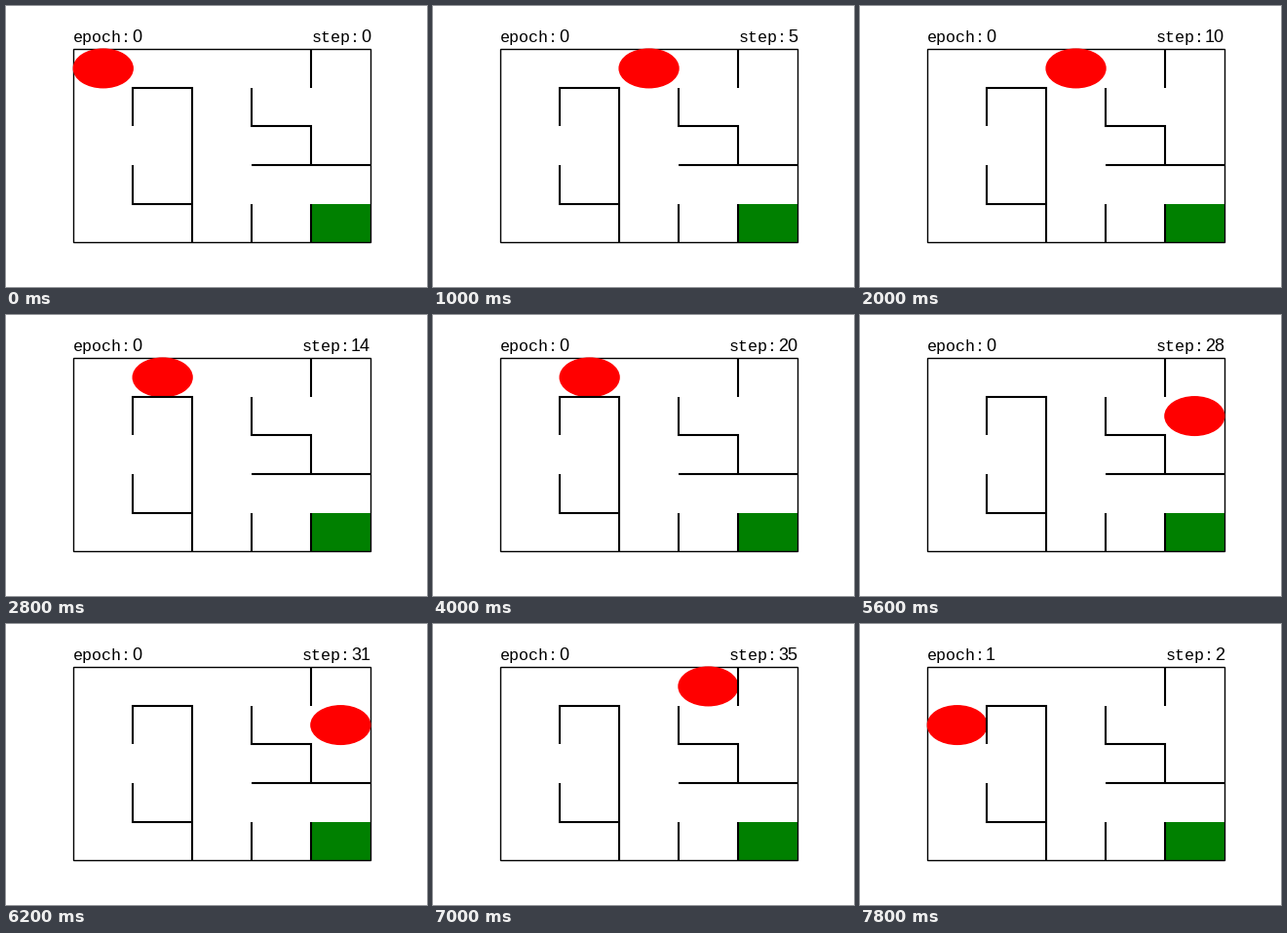
Write a matplotlib script that moves like this. It is 432 px wide and 288 px high and loops after 8 s.

```python
import matplotlib.pyplot as plt
from matplotlib.animation import FuncAnimation
from matplotlib.patches import Ellipse, Rectangle

W, H, DPI = 432, 288, 100
LEFT, TOP = 69.3, 44.1
CELL_W, CELL_H = 60.9, 39.65
SIZE = 5
PITCH = 10          # width of one label character
BASELINE = 37
FRAMES, INTERVAL = 40, 200
EPOCH_STEPS = 37

# One "column row" pair per frame
PATH = ("00 10 10 20 10 20 20 21 20 30 20 30 20 10 10 00 01 00 10 00 "
        "10 20 30 31 41 42 41 42 41 41 42 41 31 30 20 30 20 "
        "00 01 01").split()

# Inner walls as (column, row) corner points
WALLS = [
    [(1, 2), (1, 1), (2, 1), (2, 5)],
    [(1, 3), (1, 4), (2, 4)],
    [(3, 1), (3, 2), (4, 2), (4, 3)],
    [(3, 3), (5, 3)],
    [(4, 0), (4, 1)],
    [(3, 4), (3, 5)],
    [(4, 4), (4, 5)],
]


def pos(col, row):
    return LEFT + col * CELL_W, TOP + row * CELL_H


fig = plt.figure(figsize=(W / DPI, H / DPI), dpi=DPI, facecolor="white")
ax = fig.add_axes([0, 0, 1, 1])
ax.set_xlim(0, W)
ax.set_ylim(H, 0)
ax.axis("off")

ax.add_patch(Rectangle(pos(SIZE - 1, SIZE - 1), CELL_W, CELL_H,
                       facecolor="green", linewidth=0, zorder=1))
ax.add_patch(Rectangle(pos(0, 0), SIZE * CELL_W, SIZE * CELL_H,
                       fill=False, edgecolor="black", linewidth=1, zorder=2))
for wall in WALLS:
    xs, ys = zip(*(pos(c, r) for c, r in wall))
    ax.plot(xs, ys, color="black", linewidth=1.5,
            solid_capstyle="butt", solid_joinstyle="miter", zorder=4)

ball = Ellipse(pos(0.5, 0.5), CELL_W, CELL_H, facecolor="red",
               edgecolor="red", linewidth=1, zorder=3)
ax.add_patch(ball)


def label(x, word, font, pixels):
    return ax.text(x, BASELINE, word, family=font, fontsize=pixels * 72 / DPI,
                   color="black", va="baseline", ha="left", zorder=5)


def word_label(x, word):
    return label(x, word, "Liberation Mono", PITCH / 0.6)


def number_label(x):
    return label(x, "", "Liberation Sans", PITCH / 0.556)


RIGHT = 374
word_label(69, "epoch:")
epoch_text = number_label(69 + 6 * PITCH)
step_word = word_label(RIGHT, "step:")
step_text = number_label(RIGHT)


def update(i):
    epoch, step = divmod(i, EPOCH_STEPS)
    col, row = map(int, PATH[i])
    ball.center = pos(col + 0.5, row + 0.5)
    epoch_text.set_text(str(epoch))
    step_text.set_text(str(step))
    number_x = RIGHT - PITCH * len(str(step))
    step_text.set_x(number_x)
    step_word.set_x(number_x - 5 * PITCH)
    return ball, epoch_text, step_text, step_word


anim = FuncAnimation(fig, update, frames=FRAMES, interval=INTERVAL,
                     repeat=True, repeat_delay=0, blit=False)
plt.show()
```
